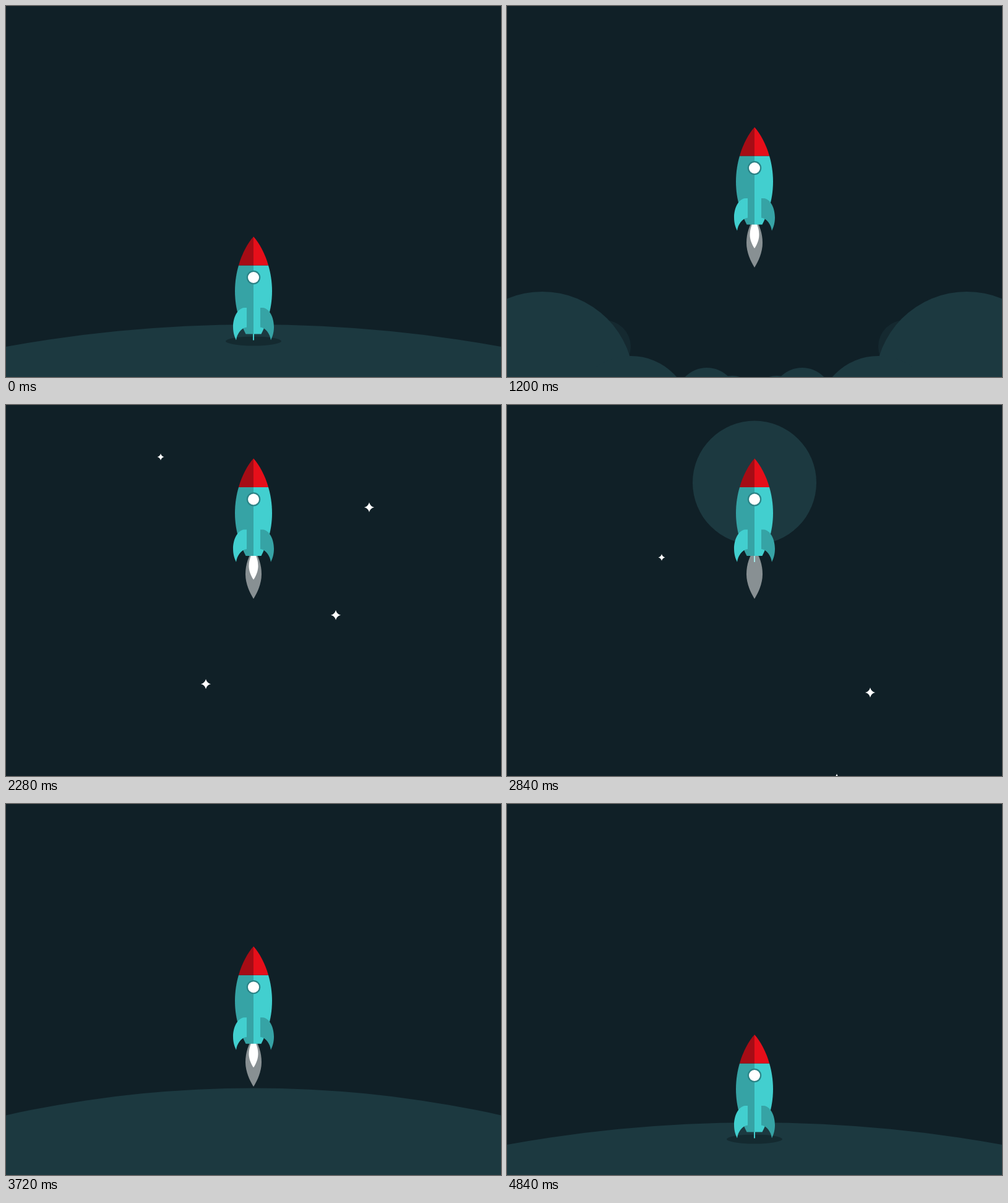
Recreate the animation shown at these times as an HTML page with a canvas. Size 800 px wide and 600 px high, loop 4960 ms.

```html
<!DOCTYPE html>
<html lang="en">
<head>
<meta charset="utf-8">
<title>Rocket trip</title>
<style>
  html, body { margin: 0; width: 100%; height: 100%; overflow: hidden; background: #102027; }
  canvas { display: block; }
</style>
</head>
<body>
<canvas id="stage" width="800" height="600"></canvas>
<script>
const ctx = document.getElementById('stage').getContext('2d');
const LOOP = 4960, STEP = 40;
const SKY = '#102027', LAND = '#1c3940', SHADE = '#142a30';
const LIGHT = '#42cfcf', DARK = '#36a3a5';

// Rocket parts, relative to the tip of the nose
const half = {
  nose: new Path2D('M0 0C9 9.5 19 28 24 46.5H0Z'),
  body: new Path2D('M0 46.5H24C27.5 58 30 73 30 88C30 120 20 142 12.5 157.5H0Z'),
  fin: new Path2D('M11 115H15C26 116 33 131 33 146C33 155 31 161 28 167.5C27 158 20 147.5 11 146.5Z')
};
const flames = {
  outer: new Path2D('M0 148C-8 156 -13 172 -13 187C-13 203 -6 217 0 227C6 217 13 203 13 187C13 172 8 156 0 148Z'),
  inner: new Path2D('M0 150C-5 157 -7.5 166 -7.5 174C-7.5 182 -4 190 0 196C4 190 7.5 182 7.5 174C7.5 166 5 157 0 150Z'),
  core: new Path2D('M0 150C-2 153 -3.5 158 -3.5 162C-3.5 167 -2 171 0 174C2 171 3.5 167 3.5 162C3.5 158 2 153 0 150Z')
};

// x, y at time t0, t0, speed in px/ms, radius
const stars = [
  [323, 66, 1560, 0.535, 8],
  [533, 0, 1560, 0.472, 8],
  [587, 465, 2840, 0.535, 8],
  [250, 246.5, 2840, 0.29, 5.5]
];
// Left half of the smoke: x, y, radius
const puffs = [[57, 512, 148], [200, 566, 98], [323, 536, 49], [364, 540, 40]];
const haze = [157, 453, 43];

const ramp = (t, a, b) => Math.min(1, Math.max(0, (t - a) / (b - a)));
const easeOut = u => Math.sin(u * Math.PI / 2);

function fill(path, color) {
  ctx.fillStyle = color;
  ctx.fill(path);
}

function ellipse(x, y, rx, ry, color) {
  ctx.beginPath();
  ctx.ellipse(x, y, rx, ry, 0, 0, Math.PI * 2);
  ctx.fillStyle = color;
  ctx.fill();
}

const circle = (x, y, r, color) => ellipse(x, y, r, r, color);

function drawStar(t, [x, y0, t0, speed, r]) {
  const y = y0 + speed * (t - t0), c = r * 0.2;
  if (y < -r || y > 600 + r) return;
  ctx.beginPath();
  ctx.moveTo(x, y - r);
  ctx.quadraticCurveTo(x + c, y - c, x + r, y);
  ctx.quadraticCurveTo(x + c, y + c, x, y + r);
  ctx.quadraticCurveTo(x - c, y + c, x - r, y);
  ctx.quadraticCurveTo(x - c, y - c, x, y - r);
  ctx.fillStyle = '#fff';
  ctx.fill();
}

function drawSmoke([x, y, r], grow, drop, color) {
  const dx = (400 - x) * grow, cy = 560 + (y - 560) * grow + drop;
  for (const side of [-1, 1]) circle(400 + side * dx, cy, r * grow, color);
}

function drawLaunchPad(t, rise) {
  const drop = 300 * ramp(t, 880, 1440) ** 2;
  const grow = easeOut(ramp(t, 480, 880));
  if (grow > 0) drawSmoke(haze, grow, drop, 'rgba(28,57,64,0.4)');
  circle(400, 2755 + drop, 2240, LAND);
  if (grow > 0) for (const puff of puffs) drawSmoke(puff, grow, drop, LAND);
  ellipse(400, 542 + drop, 45 * (1 - rise), 7.5 * (1 - rise), SHADE);
}

// The planet drops in from the top, then swells into the landing ground
function drawPlanet(t) {
  const e = easeOut(ramp(t, 3078, 4138));
  const top = t < 3078 ? 216 - 0.8 * (3078 - t) : 216 + 299 * e;
  const r = 100 + 2140 * e;
  circle(400, top + r, r, LAND);
  const s = ramp(t, 3840, 4240);
  if (s > 0) ellipse(400, 542, 45 * s, 7.5 * s, SHADE);
}

function drawFlame(t) {
  const size = ramp(t, 480, 600) * (1 - ramp(t, 4460, 4720));
  if (size <= 0) return;
  const phase = (t / STEP) % 3;
  ctx.save();
  ctx.translate(0, 157 * (1 - size));
  ctx.scale(1, size);
  fill(flames.outer, 'rgba(255,255,255,0.5)');
  if (phase === 0) fill(flames.inner, '#fff');
  if (phase === 1) {
    fill(flames.inner, 'rgba(255,255,255,0.8)');
    fill(flames.core, '#fff');
  }
  ctx.restore();
}

function drawRocket(t, y) {
  ctx.save();
  ctx.translate(400, y);
  ctx.fillStyle = LIGHT;
  ctx.fillRect(-1, 150, 2, 17.5);
  drawFlame(t);
  for (const side of [-1, 1]) {
    const left = side < 0;
    ctx.save();
    ctx.scale(side, 1);
    fill(half.body, left ? DARK : LIGHT);
    fill(half.nose, left ? '#a60c15' : '#e60f1a');
    fill(half.fin, left ? LIGHT : DARK);
    ctx.restore();
  }
  circle(0, 66, 11.2, '#2b8487');
  circle(0, 66, 9, '#fff');
  ctx.restore();
}

function draw(t) {
  const rise = ramp(t, 480, 1440) ** 1.674;
  const fall = ramp(t, 2843, 4592);
  ctx.fillStyle = SKY;
  ctx.fillRect(0, 0, 800, 600);
  if (t > 1400) stars.forEach(star => drawStar(t, star));
  if (t < 1440) drawLaunchPad(t, rise);
  if (t > 2560) drawPlanet(t);
  drawRocket(t, 373 - 286.5 * (rise - fall));
}

const start = performance.now();
function tick() {
  const t = (performance.now() - start) % LOOP;
  draw(Math.min(4840, Math.floor(t / STEP) * STEP));
  requestAnimationFrame(tick);
}
tick();
</script>
</body>
</html>
```
